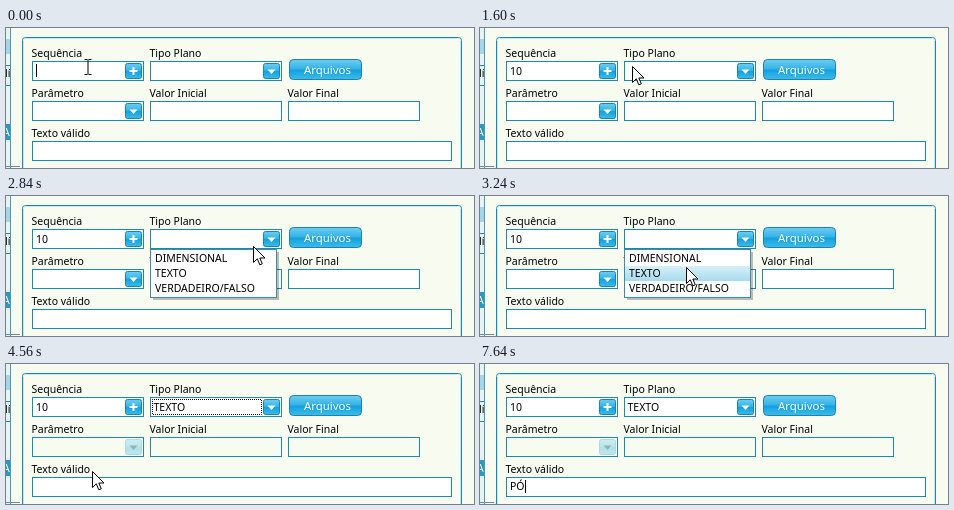
These frames come from a looping animation (468 px wide and 140 px high, 8000 ms). An HTML page:

```html
<!DOCTYPE html>
<html lang="pt">
<head>
<meta charset="utf-8">
<title>Formulário</title>
<style>
  html, body { margin: 0; width: 468px; height: 140px; overflow: hidden; background: #f7fbf0; }
  svg { display: block; }
  text { font: 10.5px "Noto Sans", "Open Sans", sans-serif; fill: #000; white-space: pre; }
  .field { fill: #fff; stroke: #2086ab; }
  .button path { fill: #fff; }
  .disabled .field { fill: #f7fbf0; }
  .disabled .button rect { opacity: .3; }
  .disabled .button path { fill: #8db8b0; }
  .caption { font-size: 11.4px; fill: #fff; }
</style>
</head>
<body>
<svg width="468" height="140" viewBox="0 0 468 140">
  <defs>
    <linearGradient id="blue" x2="0" y2="1">
      <stop offset="0" stop-color="#6ccdf2"/>
      <stop offset=".48" stop-color="#35b2e6"/>
      <stop offset=".52" stop-color="#149fdc"/>
      <stop offset="1" stop-color="#3abdec"/>
    </linearGradient>
    <linearGradient id="hover" x2="0" y2="1">
      <stop offset="0" stop-color="#d6eff8"/>
      <stop offset="1" stop-color="#a6dbf0"/>
    </linearGradient>
  </defs>

  <rect width="468" height="140" fill="#f7fbf0"/>
  <g id="margin">
    <rect width="4" height="140" fill="#e6f3f3"/>
    <rect y="11" width="4" height="15" fill="#a4d6e6"/>
    <rect y="37" width="4" height="1" fill="#2086ab"/>
    <text x="-1" y="49">lí</text>
    <rect y="57" width="4" height="1" fill="#2086ab"/>
    <rect y="96" width="4" height="16" fill="#2699c8"/>
    <text x="-3" y="108" style="fill:#fff">A</text>
    <path d="M4.5 0V140" stroke="#4d98b0"/>
    <path d="M0 138.5H14" stroke="#668f99"/>
  </g>
  <rect x="16.5" y="9.5" width="439" height="150" rx="3" fill="none" stroke="#2086ab"/>
  <rect x="17.5" y="10.5" width="437" height="150" rx="2" fill="none" stroke="#c4e6ee"/>

  <g id="form"></g>
  <rect id="focus" x="146.5" y="35.5" width="109" height="15" fill="none" stroke="#000" stroke-dasharray="1" stroke-dashoffset=".5"/>
  <text id="sequence" x="30" y="47"></text>
  <text id="plan" x="147.5" y="47"></text>
  <text id="valid" x="30" y="126"></text>
  <rect id="caret" width="1" height="13" fill="#000"/>

  <g id="list">
    <rect x="147" y="56" width="126" height="48" fill="#000" opacity=".25"/>
    <rect x="144.5" y="53.5" width="126" height="48" fill="#fff" stroke="#3f8aa5"/>
    <rect id="row" x="145" width="125" height="15" fill="url(#hover)"/>
  </g>

  <g id="arrow">
    <path d="M-.5 .5V16.5L3.3 12.8L5.8 18.8L8.3 17.8L5.8 12H11Z" fill="#fff" stroke="#000"/>
  </g>
  <path id="beam" d="M-3.5 -7.5H-.5M.5 -7.5H3.5M0 -7V7M-3.5 7.5H-.5M.5 7.5H3.5" fill="none" stroke="#000"/>
</svg>
<script>
const LOOP = 8000, STEP = 40;
const byId = id => document.getElementById(id);

function add(parent, tag, attrs, content = '') {
  const el = document.createElementNS('http://www.w3.org/2000/svg', tag);
  for (const key in attrs) el.setAttribute(key, attrs[key]);
  el.textContent = content;
  parent.append(el);
  return el;
}

// A labelled input box, with an optional button glyph at its right end.
function addField(label, x, y, width, glyph) {
  const group = add(byId('form'), 'g', {});
  add(group, 'text', { x: x - .5, y: y - 4 }, label);
  add(group, 'rect', { class: 'field', x: x + .5, y: y + .5, width: width - 1, height: 19 });
  if (glyph) {
    const button = add(group, 'g', { class: 'button', transform: `translate(${x + width - 19} ${y + 2})` });
    add(button, 'rect', { x: .5, y: .5, width: 16, height: 15, rx: 2, fill: 'url(#blue)', stroke: '#1c82b0' });
    add(button, 'path', { d: glyph });
  }
  return group;
}

const PLUS = 'M7.5 4h2v3h3v2h-3v3h-2v-3h-3v-2h3z';
const DOWN = 'M4.5 6.5h8l-4 4.5z';
addField('Sequência', 26, 33, 112, PLUS);
addField('Tipo Plano', 144, 33, 132, DOWN);
const dependent = [
  addField('Parâmetro', 26, 73, 112, DOWN),
  addField('Valor Inicial', 144, 73, 132),
  addField('Valor Final', 282, 73, 132)
];
addField('Texto válido', 26, 113, 420);
add(byId('form'), 'rect', { x: 283.5, y: 31.5, width: 72, height: 20, rx: 4, fill: 'url(#blue)', stroke: '#1c82b0' });
add(byId('form'), 'text', { class: 'caption', x: 298, y: 46 }, 'Arquivos');
['DIMENSIONAL', 'TEXTO', 'VERDADEIRO/FALSO'].forEach((option, i) =>
  add(byId('list'), 'text', { x: 149, y: 66 + 15 * i }, option));

// Pointer stops: time, x, y
const path = [
  [0, 82, 39], [1240, 82, 39], [1600, 153, 38], [1800, 153, 38], [2360, 249, 41],
  [2560, 262, 43], [2700, 262, 43], [3240, 207, 71], [3840, 207, 72],
  [4280, 178, 74], [4560, 87, 107], [4840, 67, 120], [LOOP, 67, 120]
];
const caretOn = [[0, 280], [800, 1480], [2000, 2520], [5520, 6080], [6600, LOOP]];

const within = (t, from, to) => t >= from && t < to;
const show = (id, on) => byId(id).setAttribute('display', on ? 'inline' : 'none');

function pointerAt(t) {
  const i = path.findIndex(stop => stop[0] > t);
  const [t0, x0, y0] = path[i - 1], [t1, x1, y1] = path[i];
  const k = (t - t0) / (t1 - t0);
  return [Math.round(x0 + (x1 - x0) * k), Math.round(y0 + (y1 - y0) * k)];
}

function render(t) {
  byId('sequence').textContent = t < 800 ? '' : t < 960 ? '1' : '10';
  byId('plan').textContent = t < 3480 ? '' : 'TEXTO';
  byId('valid').textContent = t < 7160 ? '' : t < 7640 ? 'P' : 'PÓ';
  show('focus', within(t, 3480, 5520));
  dependent.forEach(group => group.setAttribute('class', t >= 3840 ? 'disabled' : ''));

  const last = t >= 5520;
  const length = byId(last ? 'valid' : 'sequence').getComputedTextLength();
  byId('caret').setAttribute('x', Math.round(30 + length));
  byId('caret').setAttribute('y', last ? 116 : 36);
  show('caret', caretOn.some(([from, to]) => within(t, from, to)));

  const [x, y] = pointerAt(t);
  const visible = !within(t, 800, 1240) && t < 7160;
  const overText = x < 118 && y < 53 || y >= 113;
  for (const id of ['arrow', 'beam']) byId(id).setAttribute('transform', `translate(${x} ${y})`);
  show('arrow', visible && !overText);
  show('beam', visible && overText);

  show('list', within(t, 2680, 3480));
  const row = Math.floor((y - 54) / 15.5);
  show('row', row >= 0);
  byId('row').setAttribute('y', 55 + 15 * Math.max(row, 0));
}

const start = performance.now();
function frame() {
  const t = (performance.now() - start) % LOOP;
  render(Math.floor(t / STEP) * STEP);
  requestAnimationFrame(frame);
}
frame();
</script>
</body>
</html>
```
